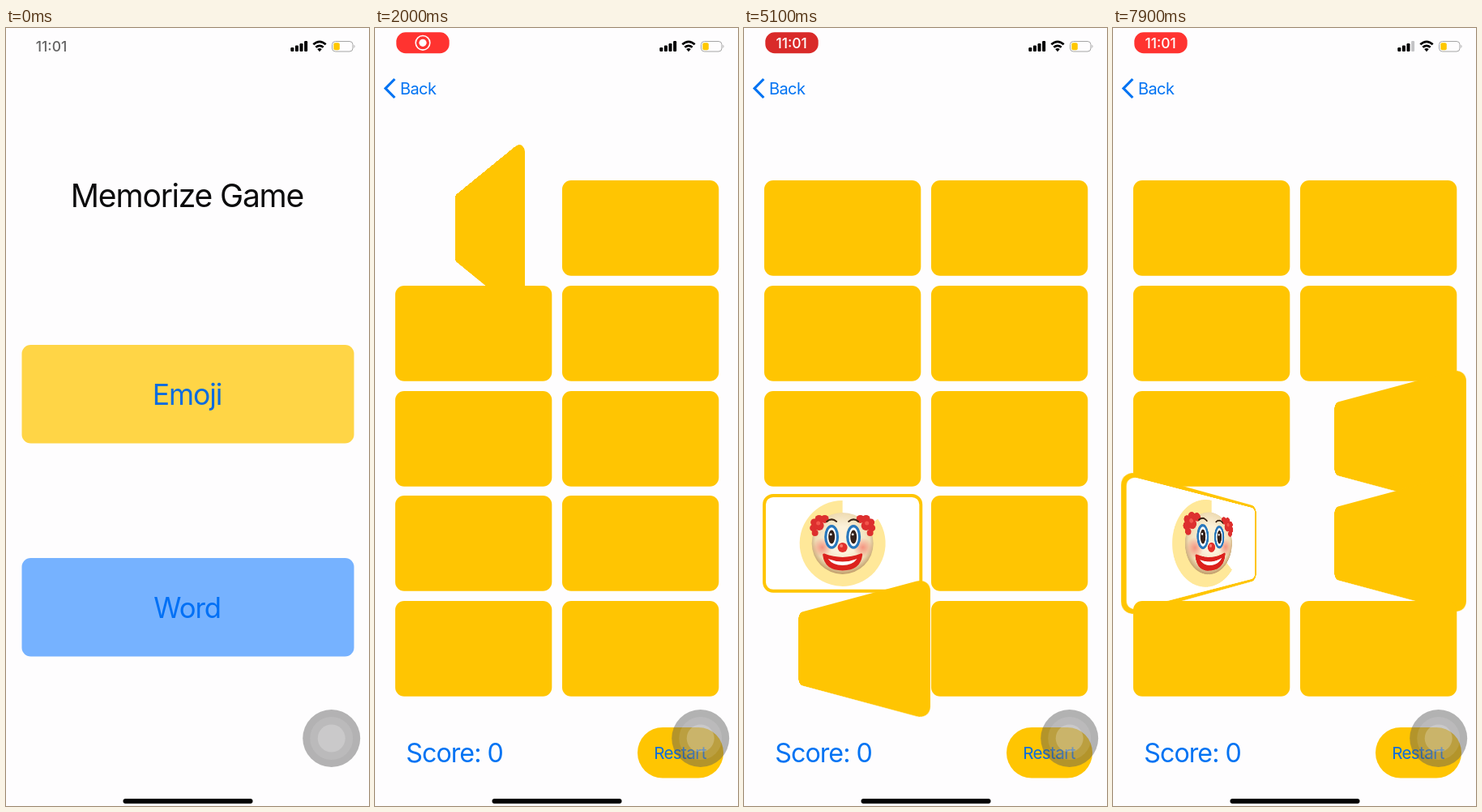
Animation of 448 by 960 pixels, one loop 8 s. Source, as an HTML page:

```html
<!DOCTYPE html>
<html lang="en">
<head>
<meta charset="utf-8">
<title>Memorize Game</title>
<style>
  html, body { margin: 0; width: 100%; height: 100%; overflow: hidden; background: #fefdfe; }
  #stage { position: relative; width: 448px; height: 960px; overflow: hidden; }
  .page, .page > .layer, #overlay { position: absolute; left: 0; top: 0; width: 448px; height: 960px; }
  .page { background: #fefdfe; }
  .card { position: absolute; width: 193.3px; height: 117.8px; overflow: visible; }
  text { font-family: Inter, Roboto, sans-serif; letter-spacing: -0.03em; }
  .link { fill: #0273f3; }
  .mid { text-anchor: middle; }
  .clock { font-size: 17.5px; font-weight: 500; letter-spacing: 0; }
</style>
</head>
<body>
<div id="stage">
  <div class="page" id="menu">
    <svg class="layer" viewBox="0 0 448 960">
      <text class="mid" x="223.5" y="221" font-size="39" fill="#0b0b0c">Memorize Game</text>
      <rect x="19.5" y="391" width="410" height="121.5" rx="11" fill="#ffd546"/>
      <text class="mid" id="emojiLabel" x="223.5" y="465" font-size="35.5" fill="#0b6cdf">Emoji</text>
      <rect x="19.5" y="654" width="410" height="121.5" rx="11" fill="#76b2ff"/>
      <text class="mid" x="223.7" y="728" font-size="34.7" fill="#0070f5">Word</text>
      <rect id="dim" width="448" height="960" opacity="0"/>
    </svg>
  </div>

  <div class="page" id="game">
    <div id="cards"></div>
    <svg class="layer" viewBox="0 0 448 960">
      <path d="M24.3 63 L13 74.5 L24.3 86" fill="none" stroke="#0273f3" stroke-width="3.2"/>
      <text class="link" x="31" y="81.5" font-size="20">Back</text>
      <text class="link" x="38.3" y="906.3" font-size="32.2">Score: 0</text>
      <rect x="324" y="863" width="106" height="62.5" rx="31" fill="#ffc502"/>
      <text class="mid" x="376.5" y="902" font-size="20.6" fill="#0b6cdf">Restart</text>
    </svg>
  </div>

  <svg id="overlay" viewBox="0 0 448 960">
    <text class="clock mid" id="plainClock" x="56" y="28.7" fill="#111">11:01</text>
    <g id="pill">
      <rect id="pillBody" x="26.3" y="5.3" width="65.4" height="25.9" rx="11.5"/>
      <g id="record">
        <circle cx="59" cy="18.3" r="8.8" fill="none" stroke="#fff" stroke-width="1.6"/>
        <circle cx="59" cy="18.3" r="4.6" fill="#fff"/>
      </g>
      <text class="clock mid" id="pillClock" x="58.7" y="24.5" fill="#fff">11:01</text>
    </g>
    <g id="signal"></g>
    <g fill="none" stroke="#000" stroke-width="2.7">
      <path d="M379.3 20.3 Q387 13.4 394.7 20.3"/>
      <path d="M382.3 23.8 Q387 19.8 391.7 23.8"/>
    </g>
    <path d="M384.2 26 Q387 23.8 389.8 26 L387 29.2 Z"/>
    <rect x="402.5" y="16.5" width="25.5" height="12.5" rx="4" fill="none" stroke="#a5a5a5"/>
    <path d="M429.5 20.5 q2 2.2 0 4.5 z" fill="#a5a5a5"/>
    <rect x="404.3" y="18.3" width="7.5" height="9" rx="2" fill="#ffc800"/>
    <g transform="translate(401.7 876.5)">
      <circle r="35.5" fill="#5a5a5a" fill-opacity=".46"/>
      <circle r="26.5" fill="#fff" fill-opacity=".1"/>
      <circle r="17" fill="#fff" fill-opacity=".22"/>
    </g>
    <rect x="144.5" y="951" width="160" height="6" rx="3"/>
  </svg>

  <svg width="0" height="0" style="position:absolute">
    <defs>
      <radialGradient id="skin" cx=".5" cy=".45" r=".55">
        <stop offset=".4" stop-color="#fcf2db"/><stop offset=".8" stop-color="#efdcb4"/><stop offset="1" stop-color="#bf9c68"/>
      </radialGradient>
      <radialGradient id="blush">
        <stop offset="0" stop-color="#f5796a" stop-opacity=".75"/><stop offset="1" stop-color="#f5796a" stop-opacity="0"/>
      </radialGradient>
      <radialGradient id="peel" cx=".5" cy=".4">
        <stop offset=".2" stop-color="#f88b23"/><stop offset="1" stop-color="#c75412"/>
      </radialGradient>
      <radialGradient id="pale" cx=".5" cy=".4">
        <stop offset=".4" stop-color="#fafafa"/><stop offset="1" stop-color="#c9cbd2"/>
      </radialGradient>
      <g id="eye">
        <ellipse rx="7.4" ry="13.2" fill="#fff" stroke="#2878bd" stroke-width="3.2"/>
        <ellipse rx="4" ry="8.5" fill="#33211b"/>
        <circle cx="-1" cy="-3" r="1.4" fill="#fff"/>
        <path d="M-6 -19 Q0 -24 6 -19" fill="none" stroke="#3b2416" stroke-width="2" stroke-linecap="round"/>
      </g>
      <g id="hair" fill="#dd2f2e">
        <circle cx="-22" cy="-30" r="5"/><circle cx="-29" cy="-30" r="5"/>
        <circle cx="-35" cy="-26" r="4.5"/><circle cx="-36" cy="-19" r="4.5"/>
        <circle cx="-34" cy="-13" r="4"/><circle cx="-29" cy="-22" r="6"/>
        <circle cx="-30" cy="-25" r="2.5" fill="#f2564c"/>
      </g>
      <g id="clown">
        <circle r="38" fill="url(#skin)"/>
        <circle cx="-25" cy="5" r="12" fill="url(#blush)"/><circle cx="25" cy="5" r="12" fill="url(#blush)"/>
        <use href="#hair"/><use href="#hair" transform="scale(-1 1)"/>
        <use href="#eye" x="-13.5" y="-8"/><use href="#eye" x="13.5" y="-8"/>
        <circle cy="5" r="6" fill="#e3302b"/><circle cx="-1.5" cy="3" r="2" fill="#f77d70"/>
        <path d="M-23 14 Q0 23 23 14 Q21 32 0 32 Q-21 32 -23 14Z" fill="#dc211d" stroke="#dc211d" stroke-width="3" stroke-linejoin="round"/>
        <path d="M-18 19 Q0 26 18 19 Q12 27 0 27 Q-12 27 -18 19Z" fill="#fff"/>
      </g>
      <g id="pumpkin">
        <path d="M-5 -24 Q-2 -31 -8 -35 L3 -40 Q8 -33 7 -24Z" fill="#477a2b"/>
        <ellipse cy="5" rx="38" ry="34" fill="url(#peel)"/>
        <g fill="none" stroke="#b64a10" stroke-width="1.8">
          <ellipse cy="5" rx="25" ry="33.5"/><ellipse cy="5" rx="10" ry="33.5"/>
        </g>
        <path d="M-14 -26 Q0 -33 14 -26 Q7 -19 0 -22 Q-8 -18 -14 -26Z" fill="#3c6b25"/>
        <path d="M-23 4 L-15 -13 L-6 3Z M23 4 L15 -13 L6 3Z M-4 11 L0 4 L4 11Z
          M-27 11 Q0 25 27 11 Q20 33 6 32 L5 26 L-5 26 L-6 32 Q-20 33 -27 11Z" fill="#ffd93d"/>
      </g>
      <g id="ghost">
        <path d="M-26 36 Q-29 -38 0 -38 Q29 -38 26 36 L17 29 L9 37 L0 30 L-9 37 L-17 29Z" fill="url(#pale)"/>
        <ellipse cx="-9" cy="-14" rx="5" ry="7"/><ellipse cx="10" cy="-14" rx="6" ry="8"/>
        <ellipse cy="7" rx="9" ry="10" fill="#e04a52"/>
      </g>
      <g id="skull">
        <path d="M-34 -6 Q-34 -38 0 -38 Q34 -38 34 -6 Q34 12 21 17 L20 36 L-20 36 L-21 17 Q-34 12 -34 -6Z" fill="url(#pale)"/>
        <circle cx="-14" cy="-3" r="9.5" fill="#44464c"/><circle cx="14" cy="-3" r="9.5" fill="#44464c"/>
        <path d="M-5 17 L0 8 L5 17Z M-8 25 h1.6 v11 h-1.6z M7 25 h1.6 v11 h-1.6z" fill="#44464c"/>
      </g>
    </defs>
  </svg>
</div>

<script>
const LOOP = 8, FLIP = 0.5, BONUS = 6;
const W = 193.3, H = 117.8, PIE_R = 53;
const $ = id => document.getElementById(id);
const clamp = x => Math.min(1, Math.max(0, x));
const ramp = (t, from, to) => clamp((t - from) / (to - from));

// Each entry of `up` is a face-up interval in seconds, bounded by taps.
const deck = [
  { face: 'ghost',   up: [[1.807, 2.865]] },
  { face: 'ghost',   up: [] },
  { face: 'pumpkin', up: [[2.865, 4.18]] },
  { face: 'skull',   up: [[2.33, 2.865]] },
  { face: 'ghost',   up: [[3.5, 4.18]] },
  { face: 'clown',   up: [[6.03, 7.515]] },
  { face: 'clown',   up: [[4.18, 6.03], [7.515, 9]] },
  { face: 'skull',   up: [[6.85, 7.515]] },
  { face: 'pumpkin', up: [[4.985, 6.03]] },
  { face: 'pumpkin', up: [] }
];

$('cards').innerHTML = deck.map(({ face }, i) => `
  <svg class="card" style="left:${25.4 + (i % 2) * 205.1}px;top:${187.9 + (i >> 1) * 129.8}px">
    <rect class="back" width="${W}" height="${H}" rx="11" fill="#ffc502"/>
    <g class="front">
      <rect width="${W}" height="${H}" rx="11" fill="#fff" stroke="#ffc502" stroke-width="3.9"/>
      <g transform="translate(${W / 2} ${H / 2})">
        <path class="pie" fill="#ffc502" fill-opacity=".4"/>
        <use href="#${face}"/>
      </g>
    </g>
  </svg>`).join('');

document.querySelectorAll('.card').forEach((el, i) => {
  const part = name => el.querySelector('.' + name);
  Object.assign(deck[i], { el, back: part('back'), front: part('front'), pie: part('pie') });
});

$('signal').innerHTML = [5, 7.5, 10, 13].map((h, i) =>
  `<rect x="${351.3 + i * 5.6}" y="${29 - h}" width="4" height="${h}" rx="1.2"/>`).join('');

function piePath(used) {
  const a = used * 2 * Math.PI;
  const x = PIE_R * Math.sin(a), y = -PIE_R * Math.cos(a);
  return `M0 0 L${x} ${y} A${PIE_R} ${PIE_R} 0 ${used < 0.5 ? 1 : 0} 1 -0.01 ${-PIE_R}Z`;
}

function drawCard(card, t) {
  let raised = 0, used = 0;
  for (const [from, to] of card.up) {
    raised += ramp(t, from, from + FLIP) - ramp(t, to, to + FLIP);
    used += Math.max(0, Math.min(t, to) - from);
  }
  const angle = 180 * (1 - raised), faceUp = angle < 90;
  card.el.style.transform = raised > 0 && raised < 1 ? `perspective(${W}px) rotateY(${angle}deg)` : 'none';
  card.front.style.display = faceUp ? '' : 'none';
  card.back.style.display = faceUp ? 'none' : '';
  if (faceUp) card.pie.setAttribute('d', piePath(used / BONUS));
}

function drawStatus(t) {
  $('plainClock').setAttribute('opacity', 0.65 * (1 - ramp(t, 0, 0.25)));
  const grow = ramp(t, 0.1, 0.5);
  const scale = grow + 0.25 * Math.sin(Math.PI * grow) * grow;
  $('pill').setAttribute('transform', `translate(59 18.3) scale(${scale}) translate(-59 -18.3)`);
  $('pill').setAttribute('opacity', grow);
  const glow = 0.5 - 0.5 * Math.cos(Math.PI * (t - 0.95));
  $('pillBody').setAttribute('fill', `rgb(${215 + 40 * glow},${41 + 10 * glow},${41 + 7 * glow})`);
  const swap = ramp(t, 2.95, 3.45);
  $('record').setAttribute('opacity', 1 - swap);
  $('pillClock').setAttribute('opacity', swap);
  $('signal').lastChild.setAttribute('fill', t < 7.3 ? '#000' : '#c4c4c6');
}

function drawPages(t) {
  const push = 1 - Math.pow(1 - ramp(t, 1.1, 1.6), 3);
  $('menu').style.transform = `translateX(${-134 * push}px)`;
  $('game').style.transform = `translateX(${448 * (1 - push)}px)`;
  $('dim').setAttribute('opacity', 0.1 * push);
  $('emojiLabel').setAttribute('opacity', t > 1.05 && t < 1.25 ? 0.4 : 1);
}

const start = performance.now();
function tick() {
  // The screen advances ten times a second.
  const t = Math.floor((performance.now() - start + 8) / 100) / 10 % LOOP;
  drawPages(t);
  drawStatus(t);
  deck.forEach(card => drawCard(card, t));
  requestAnimationFrame(tick);
}
tick();
</script>
</body>
</html>
```
